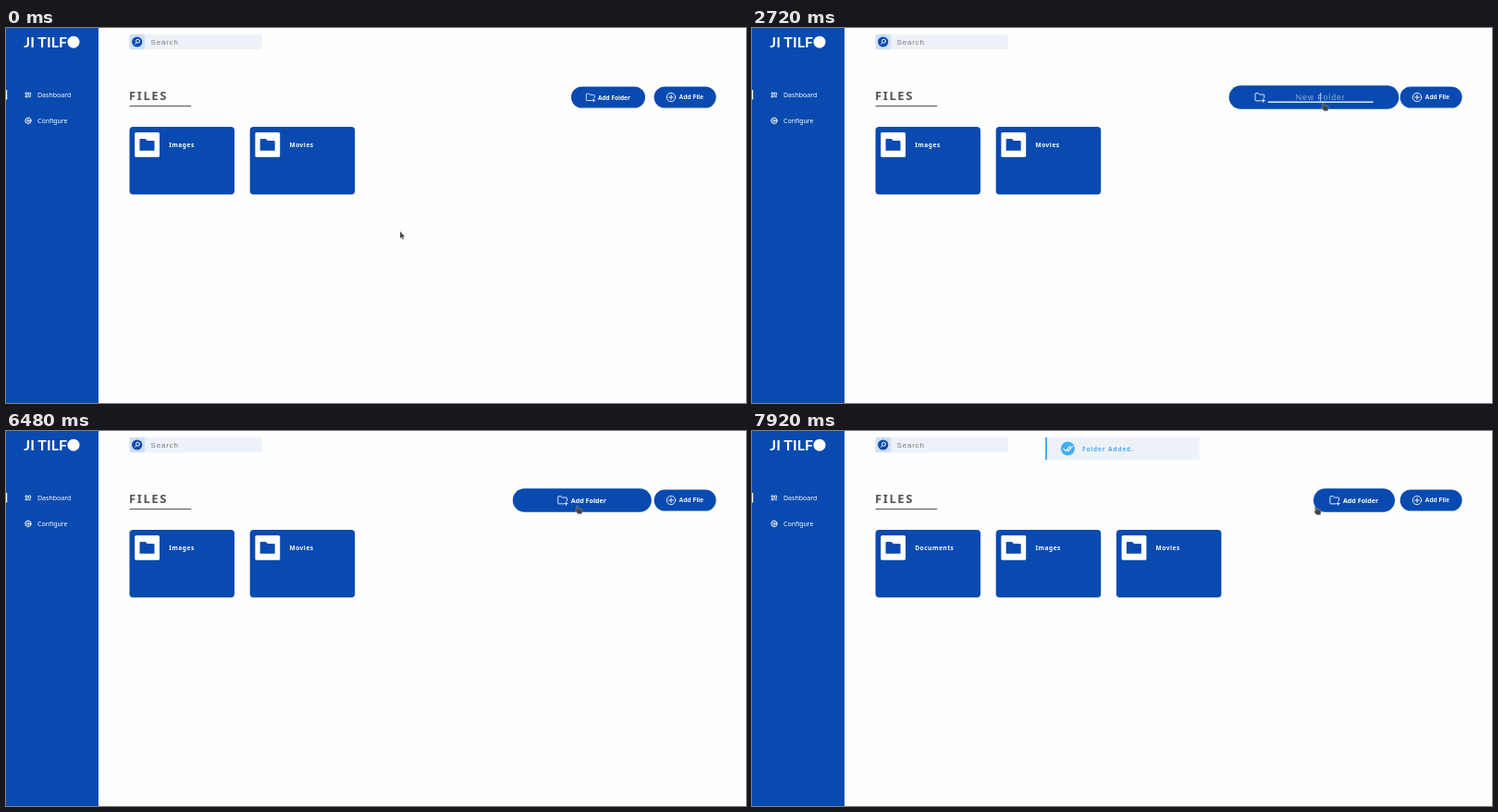
Animation of 800x406 px, one loop 8000 ms. Source, as an HTML page:

```html
<!DOCTYPE html>
<html lang="en">
<head>
<meta charset="utf-8">
<title>File dashboard</title>
<style>
  html, body { margin: 0; width: 100%; height: 100%; overflow: hidden; background: #fefefe; }
  svg { display: block; width: 800px; height: 406px; }
  text { font-family: "Noto Sans", "Open Sans", sans-serif; fill: #fff; white-space: pre; }
  .brand { font: 700 16px Lato, sans-serif; }
  .nav { font-size: 7px; font-weight: 500; }
  .title { font-size: 13px; font-weight: 700; letter-spacing: 1.6px; fill: #555; }
  .name { font-size: 6.6px; font-weight: 600; letter-spacing: .52px; }
  .field { font: 8px "Liberation Sans", Arial, sans-serif; letter-spacing: .8px; }
  .button { font-size: 6.5px; font-weight: 700; }
  .file { font: 700 6.67px "Liberation Sans", Arial, sans-serif; }
  .toast { font-size: 6.5px; font-weight: 700; letter-spacing: .85px; fill: #45adf0; }
  .line { fill: none; stroke: #fff; stroke-linecap: round; stroke-linejoin: round; }
  .blue { fill: #084ab0; }
  .pale { fill: #edf2f9; }
</style>
</head>
<body>
<svg viewBox="0 0 800 406">
  <defs>
    <g id="folderPlus" class="line" stroke-width=".8">
      <path d="M6 8H1.2Q.5 8 .5 7.2V1.2Q.5 .5 1.2 .5H3.4L4.6 1.8H8.6Q9.3 1.8 9.3 2.5V5"/>
      <path d="M8.4 6.2V9.4M6.8 7.8H10"/>
    </g>
    <g id="card">
      <rect class="blue" x="133.5" y="107" width="113.5" height="73.2" rx="4"/>
      <rect x="139.2" y="113" width="26.8" height="26.7" rx="1.5" fill="#fff"/>
      <path class="blue" d="M145.5 120H150.6L152.8 122H159.5Q160.5 122 160.5 123V132.8H144.5V121Q144.5 120 145.5 120Z"/>
    </g>
  </defs>

  <rect class="blue" width="100" height="406"/>
  <text class="brand" x="19.3" y="21.3">JI TILF</text>
  <circle cx="73" cy="15.2" r="6.5" fill="#fff"/>
  <rect y="67" width="1.2" height="10.5" fill="#fff"/>
  <path class="line" stroke-width=".8" d="M21.4 70H23.2V71.8H21.4ZM24.8 70H26.6V73H24.8ZM21.4 73.4H23.2V74.8H21.4ZM24.8 74.6H26.6"/>
  <text class="nav" x="34" y="74.8">Dashboard</text>
  <g class="line" stroke-width=".9">
    <circle cx="24" cy="100.4" r="3"/>
    <circle cx="24" cy="100.4" r="1.1"/>
    <circle cx="24" cy="100.4" r="3.5" stroke-width=".7" stroke-dasharray=".5 2.25"/>
  </g>
  <text class="nav" x="34" y="102.8">Configure</text>

  <rect class="pale" x="133.5" y="6.8" width="143.5" height="16.4" rx="2"/>
  <rect x="133.5" y="6.8" width="16.7" height="16.4" rx="2" fill="#d0e0f2"/>
  <circle class="blue" cx="141.7" cy="15" r="5.6"/>
  <g class="line"><circle cx="142.5" cy="14.2" r="2"/><path d="M141 15.7L139.3 17.4"/></g>
  <text class="field" x="156.5" y="17.7" style="fill:#777">Search</text>

  <text class="title" x="133" y="78">FILES</text>
  <rect x="133.5" y="84" width="66.7" height="1" fill="#555"/>
  <g id="cards"></g>

  <g id="toast">
    <rect class="pale" x="317" y="6.8" width="166.7" height="24.4" rx="1.5"/>
    <rect x="317" y="6.8" width="2" height="24.4" fill="#45adf0"/>
    <circle cx="341.4" cy="19" r="7.5" fill="#45adf0"/>
    <path class="line" stroke-width="1.1" d="M336.9 19.3L339.2 21.6L343.7 16.6M341 20.6L342 21.6L346.4 16.6"/>
    <text class="toast" x="357" y="21.6">Folder Added.</text>
  </g>

  <g id="adder">
    <rect id="pill" class="blue" y="-11.6" height="23.2" rx="11.6"/>
    <g id="label">
      <use href="#folderPlus" x="-24.2" y="-4.5"/>
      <text class="button" x="-11" y="2.5">Add Folder</text>
    </g>
    <g id="form">
      <use href="#folderPlus" x="-64.7" y="-4.5"/>
      <rect x="-51.7" y="4.1" width="103.4" height="1.2" fill="#fff"/>
      <text id="entry" class="field" y="2.6" text-anchor="middle"></text>
      <rect id="caret" y="-4.6" width=".8" height="9" fill="#c5d2e8"/>
    </g>
  </g>

  <rect class="blue" x="700.6" y="63.4" width="67" height="23.2" rx="11.6"/>
  <g class="line" stroke-width=".9"><circle cx="719" cy="75" r="4.7"/><path d="M716.5 75H721.5M719 72.5V77.5"/></g>
  <text class="file" x="727.6" y="77.3">Add File</text>

  <path id="arrow" d="M0 0V8L1.8 6.4L3 9L4.2 8.4L3.1 6H5.3Z" fill="#444" stroke="#ddd" stroke-width=".3"/>
  <path id="beam" class="line" style="stroke:#c4c8d0" stroke-width=".8" d="M-1.6 -4H1.6M-1.6 4H1.6M0 -4V4"/>
  <path id="hand" d="M1.2 .3Q2.2 -.3 2.6 .8L3.3 3L6.6 3.3Q8 3.8 7.7 5.4L7 8.7H2.8L.2 5.6Q-.3 4.4 1.7 4.9L.9 1.2Z" fill="#444" stroke="#bbb" stroke-width=".4"/>
</svg>
<script>
const $ = id => document.getElementById(id);
const LOOP = 8000, OPEN = 1490, CLOSE = 6435, BLINK = 600;
const KEYS = [3680, 4600, 4800, 5000, 5200, 5320, 5520, 5800, 5920];
const WORD = "Documents";

const clamp = v => Math.min(1, Math.max(0, v));
const mix = (a, b, p) => a + (b - a) * p;
const show = (id, on) => $(id).setAttribute("display", on ? "inline" : "none");
const move = (id, x, y, s = 1) => $(id).setAttribute("transform", `translate(${x} ${y}) scale(${s})`);

// The CSS "ease" curve, cubic-bezier(.25, .1, .25, 1)
function ease(x) {
  x = clamp(x);
  let lo = 0, hi = 1, u = x;
  for (let i = 0; i < 20; i++) {
    u = (lo + hi) / 2;
    const bx = .75 * u * (1 - u) + u ** 3;
    if (bx < x) lo = u; else hi = u;
  }
  return .3 * u * (1 - u) ** 2 + 3 * u * u * (1 - u) + u ** 3;
}

let shown = "";
function drawCards(names) {
  if (shown === names.join()) return;
  shown = names.join();
  $("cards").innerHTML = names.map((name, i) =>
    `<g transform="translate(${i * 130.2} 0)"><use href="#card"/><text class="name" x="176.2" y="128.7">${name}</text></g>`
  ).join("");
}

function drawAdder(t) {
  const opening = ease((Math.floor(t / 80) * 80 - OPEN) / 200);
  const open = t < CLOSE ? opening : 1 - ease((t - CLOSE) / 200);
  const editing = t >= OPEN && t < CLOSE;
  const width = mix(80, 167, open);
  move("adder", 691 - width / 2, 75, mix(1, 1.1, ease((t - 1080) / 200)));
  $("pill").setAttribute("x", -width / 2);
  $("pill").setAttribute("width", width);
  show("label", !editing);
  show("form", editing);
  if (!editing) return;

  move("form", mix(0, 6.5, open), 0);
  const count = KEYS.filter(k => k <= t).length;
  const entry = $("entry");
  entry.textContent = count ? WORD.slice(0, count) : "New Folder";
  entry.style.fill = count ? "#fff" : "#8eacd9";
  const since = t - (count ? KEYS[count - 1] : 1520);
  show("caret", Math.floor(since / BLINK) % 2 === 0);
  $("caret").setAttribute("x", count ? entry.getComputedTextLength() / 2 - .4 : -.4);
}

function drawPointer(t) {
  const p = clamp((t - 600) / 600), q = p * p * (3 - 2 * p);
  const x = mix(426, 617, q), y = mix(220, 80, q);
  const over = y < 87, typing = t >= 1520 && t < 1920;
  show("arrow", !over);
  show("beam", typing);
  show("hand", over && !typing);
  move("arrow", x, y);
  move("beam", 619, 80);
  const down = clamp((t - 1880) / 120);
  const left = 4 * clamp((t - 7080) / 120) + 2 * (t >= 7880) + 2 * (t >= 7920);
  move("hand", mix(x, 615.5, down) - left, mix(y, 81, down) + left / 8);
}

function frame(now) {
  const t = Math.floor(now % LOOP / 40) * 40;
  drawCards(t < 6920 ? ["Images", "Movies"] : ["Documents", "Images", "Movies"]);
  show("toast", t >= 6680);
  drawAdder(t);
  drawPointer(t);
  requestAnimationFrame(frame);
}
frame(0);
</script>
</body>
</html>
```
